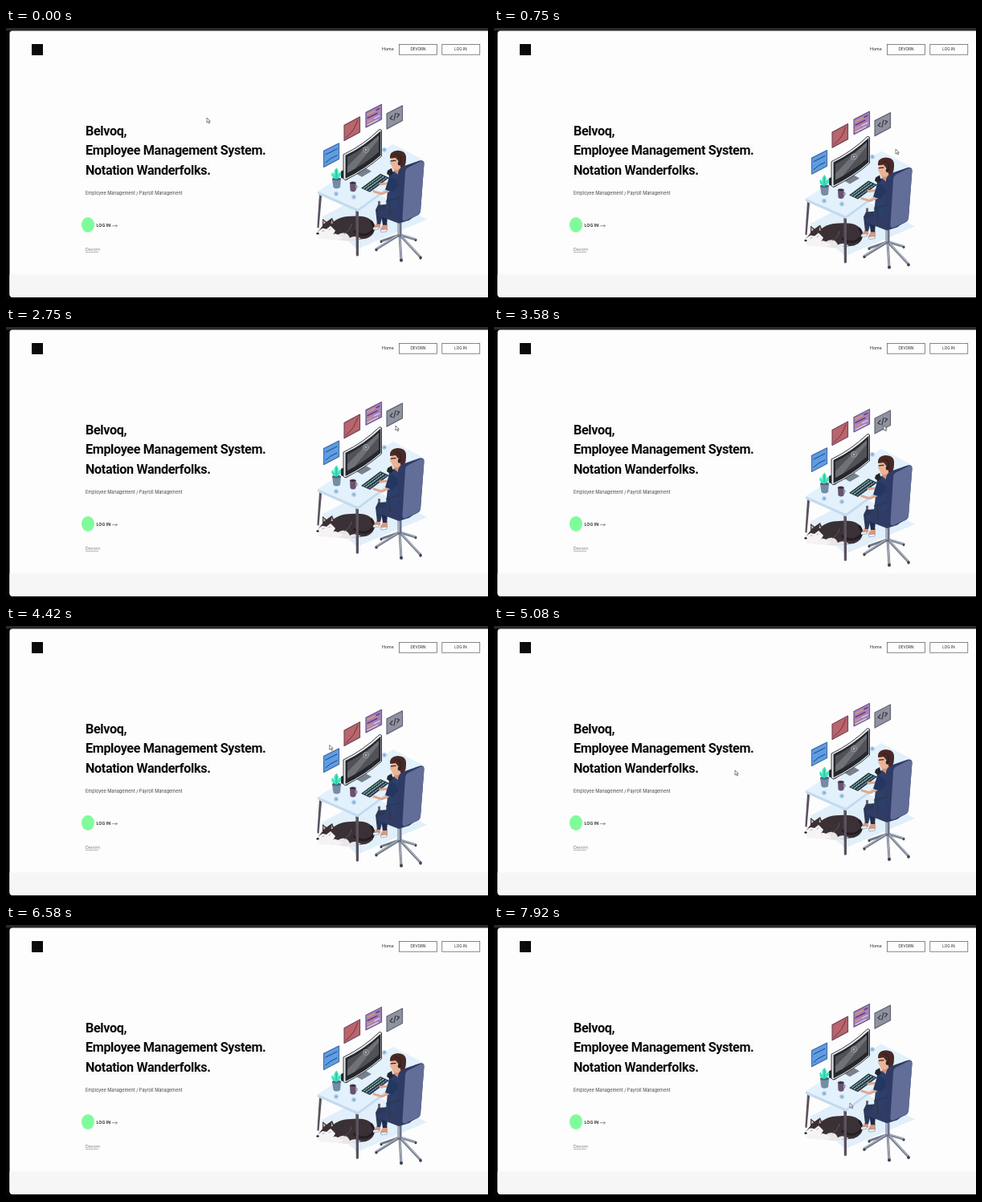
These frames come from a looping animation (600x338 px, 8000 ms). An HTML page:

```html
<!DOCTYPE html>
<html lang="en">
<head>
<meta charset="utf-8">
<title>Employee Management</title>
<style>
  html, body { margin: 0; width: 100%; height: 100%; overflow: hidden; background: #050405; }
  svg { display: block; width: 100%; height: 100%; }
  text { font-family: Inter, Roboto, sans-serif; fill: #222; }
  .title { font: 700 16.2px Roboto, sans-serif; letter-spacing: -.37px; fill: #0b0b0b; }
  .small { font-size: 5.3px; }
  .mid { font-size: 4.6px; text-anchor: middle; }
  .line { fill: none; stroke-linecap: round; stroke-linejoin: round; }
</style>
</head>
<body>
<svg viewBox="0 0 600 338">
  <rect width="600" height="338" fill="#050405"/>
  <rect width="600" height="3.400" fill="#2b272b"/>
  <path d="M600 3.400H8Q4.500 3.400 4.500 7V332Q4.500 335.700 8 335.700H600Z" fill="#fdfdfd"/>
  <path d="M600 307.500H4.500V332Q4.500 335.700 8 335.700H600Z" fill="#f6f6f6"/>

  <rect x="32" y="20" width="14" height="14" fill="#0b0b0b"/>
  <text class="small" x="468" y="28.300">Home</text>
  <g fill="none" stroke="#555" stroke-width=".7">
    <rect x="489.400" y="20.400" width="47.200" height="12.800"/>
    <rect x="542.800" y="20.400" width="47" height="12.800"/>
  </g>
  <text class="mid" x="513" y="28.400">DEVORN</text>
  <text class="mid" x="566" y="28.400">LOG IN</text>

  <path d="M99 144H323.500V162H99ZM99 168H254V187H99Z" fill="#fafafa"/>
  <text class="title" x="99" y="134">Belvoq,</text>
  <text class="title" x="99" y="158.300">Employee Management System.</text>
  <text class="title" x="99" y="182.800">Notation Wanderfolks.</text>
  <text x="99" y="207.700" style="font-size:5.570px;fill:#444">Employee Management / Payroll Management</text>
  <ellipse cx="102" cy="245.500" rx="8" ry="9.400" fill="#80fb9b"/>
  <text class="small" x="112.500" y="248.200" font-weight="600">LOG IN</text>
  <path class="line" d="M132.500 246.700H138.300M136.800 245.300L138.300 246.700L136.800 248.100" stroke="#333" stroke-width=".5"/>
  <text class="small" x="99" y="278.200" style="fill:#777">Devorn</text>
  <path d="M99 279.500H115" stroke="#888" stroke-width=".6"/>

  <g id="scene">
    <!-- floor -->
    <path d="M393 240L455 207L524 243L437 280Z" fill="#e1effa"/>

    <!-- dog -->
    <path d="M402 252Q411 239 430 239Q452 237 458 248Q462 262 448 267Q426 270 409 266Z" fill="#3a3136"/>
    <path d="M413 262Q424 256 428 266Q434 262 442 267L424 270L409 268Z" fill="#e9e6e7"/>
    <path class="line" d="M455 246Q463 257 448 262Q439 263 434 258" stroke="#241e22" stroke-width="3"/>
    <path d="M388 263Q396 259 411 261L420 266Q412 270 402 268L390 267Z" fill="#f4f2f2"/>
    <path d="M394 251L394 242L399 246L406 241L409 248L413 256L407 262L395 263L387 260Z" fill="#3a3136"/>
    <path d="M394 254L399 255L404 251L410 257L406 264L394 265L386 262Q388 257 394 254Z" fill="#f6f3f3"/>
    <path d="M395 249L394.800 244L398 247M404.500 248L405.500 243L407 248Z" fill="#d8a6a4"/>
    <ellipse cx="388" cy="260.500" rx="1.600" ry="1.200" fill="#161318"/>
    <path class="line" d="M394 257.500L396 257M402 256L404 255M421 261Q429 256 430 249" stroke="#78707a" stroke-width=".6"/>

    <!-- desk -->
    <path d="M390 212L387.300 253L389.500 254L393 214Z" fill="#5b5260"/>
    <path d="M435.300 230H439V288L437 289L435.800 288Z" fill="#5b5260"/>
    <path d="M463 220H466V240H463Z" fill="#6e6573"/>
    <path d="M388 208L482 149L520 169L438 232Z" fill="#e2f1fc"/>
    <path d="M388 208L438 230L520 170V173L438 233.500L388 211.500Z" fill="#c3daef"/>
    <g fill="#b7d5f1" stroke="#8fb4da" stroke-width=".7">
      <circle cx="411" cy="211" r="2.400"/><circle cx="433" cy="215" r="2.400"/><circle cx="471" cy="156" r="2.400"/>
    </g>
    <g fill="#5681b5">
      <circle cx="411" cy="211" r=".9"/><circle cx="433" cy="215" r=".9"/><circle cx="471" cy="156" r=".9"/>
    </g>

    <!-- monitor -->
    <path d="M417 183L425 179L432 184L431 189L424 194L417 191Z" fill="#28282e"/>
    <path d="M436 186L448 179L455 183L443 190Z" fill="#77808d"/>
    <path d="M420 162Q445 150 465 130.500L467.500 131.500V164Q447 182 422 194L420 192Z" fill="#e9edf0" stroke="#26272c" stroke-width=".9"/>
    <path d="M422.500 163Q446 152 466.500 132.500V163Q446 181 422.500 192Z" fill="#26272c"/>
    <path d="M425 165Q445 155 464 138V159Q445 175 425 185Z" fill="#505258"/>
    <path d="M425 177L451 150L464 138V143L434 180L425 185Z" fill="#6e7175"/>
    <circle cx="448" cy="156" r="3.500" fill="#686b70" stroke="#a8abad" stroke-width=".8"/>
    <path d="M447 154.300L450 156L447 157.700Z" fill="#b9bcbe"/>

    <!-- plant and mug -->
    <path d="M406 193L417 192L416 203Q411 206 407.500 203Z" fill="#758ca5"/>
    <ellipse cx="411.500" cy="192.500" rx="5.600" ry="1.800" fill="#4d6177"/>
    <path d="M411 193Q403 190 406 184Q408 186 409 188Q407 182 411.500 178.500Q415 182 413 188Q414 184 417 184Q419 189 411 193Z" fill="#3be6bb"/>
    <path class="line" d="M411 192L411.500 182" stroke="#199d83" stroke-width=".6"/>
    <path d="M428 197.500H435.500V207Q432 210 428.500 207Z" fill="#69536f"/>
    <ellipse cx="431.800" cy="197.500" rx="3.800" ry="1.700" fill="#34283a" stroke="#8b7390" stroke-width=".5"/>
    <path class="line" d="M435.500 200Q439 201 435.500 205" stroke="#69536f"/>

    <!-- keyboard -->
    <path d="M442 204L466 186L477 191L453 209Z" fill="#293844"/>
    <g class="line" stroke-width="1.200" stroke-dasharray="1.600 1.500">
      <path d="M445.500 204L467 188" stroke="#7dc7a2"/>
      <path d="M448.500 205.300L470 189.400" stroke="#b2c8d2"/>
      <path d="M452 206.800L473.500 190.900" stroke="#71a8ca"/>
    </g>

    <!-- person -->
    <path d="M462 247H466V253L460 255L458 252ZM470 248H475V256L468 258L466 255Z" fill="#d99a7e"/>
    <path d="M457 253L464 252V255L457 256ZM466 256L474 255V258L467 259Z" fill="#f0f0f3" stroke="#57617c" stroke-width=".4"/>
    <path d="M472 225L492 223V238L475 240L474 250H469L466 230Z" fill="#202c4b"/>
    <path d="M463 225L460 231L462 249H466L470 233L490 232V223Z" fill="#2b3858"/>
    <path d="M477 186Q486 179 497 183L499 230Q487 238 472 233L474 217Z" fill="#2c3f6b"/>
    <path class="line" d="M483 204L468 211L458 208M476 198L466 199" stroke="#e4a68a" stroke-width="3"/>
    <path d="M477 190Q486 189 489 201L481 209L472 206Z" fill="#243760"/>
    <path d="M484 175H494V184L488 187L483 183Z" fill="#d59478"/>
    <path d="M480 166L493 163L494 175L488 181H482L480 176L478 173Z" fill="#ecb496"/>
    <path d="M478 167Q477 158 487 157Q499 157 498 168Q498 178 492 180L489 171L485 166Z" fill="#4b2824"/>
    <path class="line" d="M485 162Q493 161 491 173M479 170L485 169.500" stroke="#25242c" stroke-width="1.100"/>
    <ellipse cx="489.500" cy="173" rx="1.800" ry="2.600" fill="#25242c"/>
    <path d="M475 182L480 179L482 186L478 189L474 186Z" fill="#26252d"/>

    <!-- chair -->
    <path class="line" d="M490 262L461 280M490 262L467 270M490 262L492 294M490 262L516 290M490 262L510 268" stroke="#6f7788" stroke-width="3"/>
    <path class="line" d="M490 261L461 279M490 261L492 291M490 261L515 288M490 261L509 267" stroke="#a9afbb" stroke-width="1.600"/>
    <g fill="#3f434f">
      <circle cx="461" cy="281" r="1.700"/><circle cx="467" cy="271" r="1.400"/><circle cx="492" cy="294" r="2"/>
      <circle cx="516" cy="291" r="1.800"/><circle cx="510" cy="269" r="1.400"/>
    </g>
    <path d="M487.500 240H492.500V264Q490 266 487.500 264Z" fill="#687289"/>
    <path d="M488 242H490V262H488Z" fill="#a6afc1"/>
    <path d="M463 232L490 226L515 234L502 244L489 248L463 238Z" fill="#303c64"/>
    <path d="M488 185Q489 179 495 176.500L515 169.500Q520.500 168.500 520.500 173L516 233Q515 237 511 238.500L496 245.500Q488 248 488 239Z" fill="#2f3b64"/>
    <path d="M497 184Q497.500 179.500 501 178L516 170.500Q520.500 169.500 520.500 174L516 232Q515 236 511 238L497 244.500Q493 245.500 493.500 240Z" fill="#626d98"/>
    <path class="line" d="M474 220L489 216M477 221L478 236" stroke="#30374e" stroke-width="2"/>

    <!-- floating panels -->
    <g stroke-width="1.200" stroke-linejoin="round">
      <path d="M395.500 157.500L414.500 148V167.500L395.500 177.500Z" fill="#5e9de4" stroke="#4a6ea5"/>
      <path d="M421 125.500L440.500 115V134L421 144.500Z" fill="#b9656c" stroke="#75495b"/>
      <path d="M448 109.500L467.500 99.500V118L448 128Z" fill="#a283bd" stroke="#6d5a8a"/>
      <path d="M474 111L493.500 101V119.500L474 130Z" fill="#8f929f" stroke="#646676"/>
    </g>
    <g class="line" stroke-width="1">
      <path d="M398 162L412 155M398 172L404 167L412 163" stroke="#204474"/>
      <path d="M423 141L430 134L433 130L438 119" stroke="#5f2838" stroke-width=".8"/>
      <path d="M450 112L459 107.500M450 121L456 118" stroke="#ef9855" stroke-width="1.300"/>
      <path d="M461 106.500L465 104.500M450 116.500L462 110.500" stroke="#6c3265" stroke-width="1.300"/>
      <path d="M458 117L465 113.500M450 125L463 118.500" stroke="#dfc9df" stroke-width="1.200"/>
    </g>
    <path class="line" d="M481 113.500L478 117L481 118.500M484.800 110.500L483 119M486.700 110.800L489.700 112L486.700 115.500" stroke="#30323d" stroke-width="1.100"/>
  </g>

  <path id="cursor" d="M0 0V6L1.500 4.700L2.600 7L3.600 6.500L2.500 4.300H4.300Z" fill="#fff" stroke="#333" stroke-width=".6"/>
</svg>
<script>
  const LOOP = 8000, STEP = 1000 / 12, BOB = 3000, LOWEST = 1100;
  const scene = document.getElementById('scene');
  const cursor = document.getElementById('cursor');
  // time, x, y
  const path = [
    [0, 250, 112], [80, 250, 112], [700, 500, 151], [1100, 500, 151],
    [1700, 485, 123], [4000, 485, 123], [4900, 300, 180],
    [5200, 300, 180], [5900, 420, 200], [7580, 440, 215], [7900, 443, 222], [LOOP, 443, 222]
  ];
  const ease = p => p * p * (3 - 2 * p);

  function cursorAt(t) {
    const i = path.findIndex(key => key[0] > t);
    const [t0, x0, y0] = path[i - 1], [t1, x1, y1] = path[i];
    const p = ease((t - t0) / (t1 - t0));
    return [x0 + (x1 - x0) * p, y0 + (y1 - y0) * p];
  }

  function draw(now) {
    const t = Math.floor((now % LOOP + 3.4) / STEP) * STEP % LOOP;
    const lift = 6.2 * Math.cos(2 * Math.PI * (t - LOWEST) / BOB);
    scene.setAttribute('transform', `translate(0 ${lift.toFixed(2)})`);
    cursor.setAttribute('transform', `translate(${cursorAt(t)})`);
    cursor.setAttribute('visibility', t > 5900 && t < 7580 ? 'hidden' : 'visible');
  }

  const start = performance.now();
  function tick() {
    draw(performance.now() - start);
    requestAnimationFrame(tick);
  }
  tick();
</script>
</body>
</html>
```
